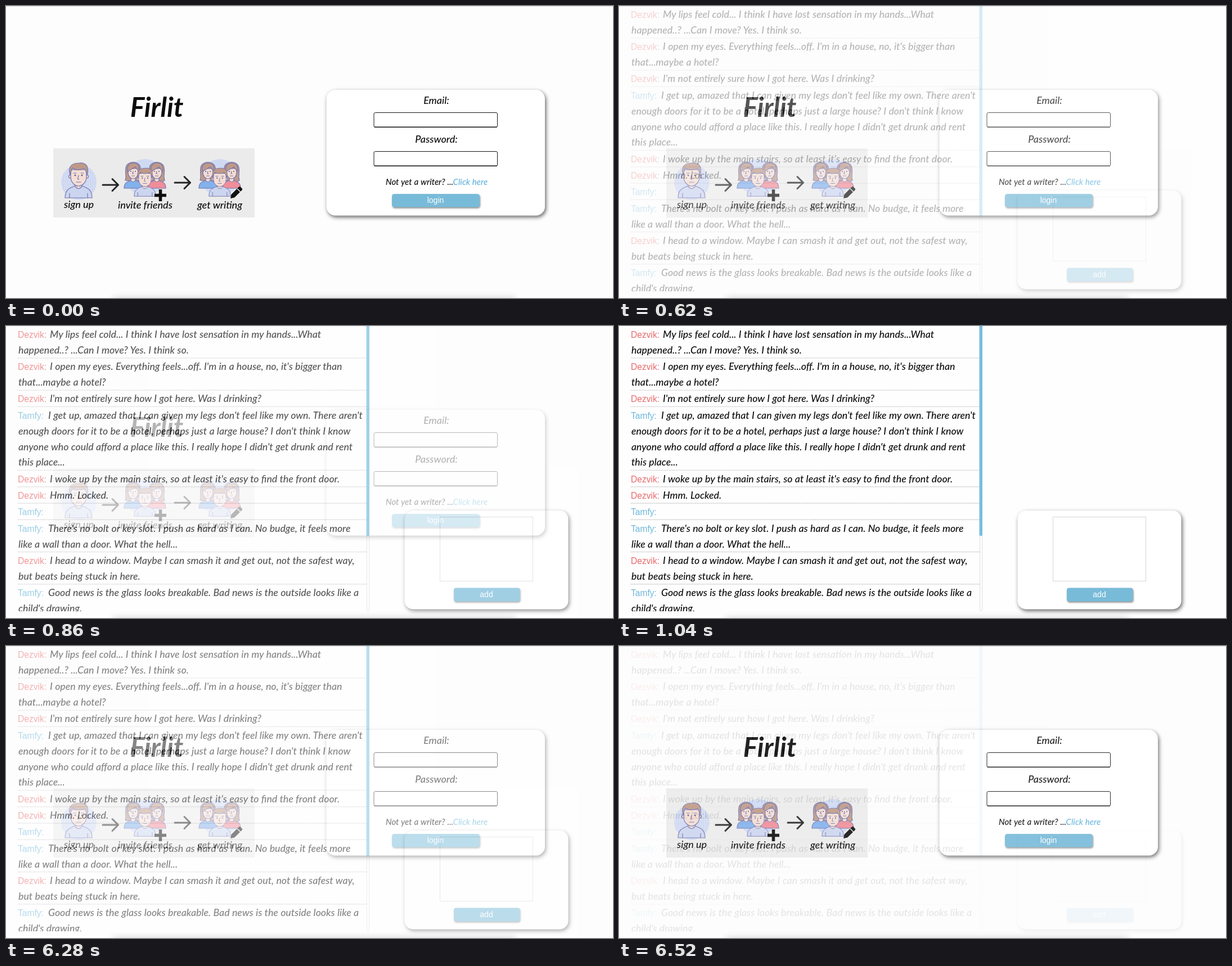
These frames come from a looping animation (1079 by 519 pixels, 6.58 s). An HTML page:

```html
<!DOCTYPE html>
<html lang="en">
<head>
<meta charset="utf-8">
<title>Story writing</title>
<style>
  html, body { margin: 0; width: 100%; height: 100%; overflow: hidden; background: #fdfdfd; }
  svg { display: block; width: 1079px; height: 519px; }
  text { font: 16px "Liberation Sans", Arial, sans-serif; white-space: pre; }
  .hand { font: italic 500 18px Lato, "Open Sans", sans-serif; fill: #0c0c0c; }
  .title { font-size: 48px; font-weight: 700; }
  .small { font-size: 15px; word-spacing: .5px; }
  .tale { font-size: 17.7px; word-spacing: .3px; }
  .mid { text-anchor: middle; }
  .link { fill: #5fb2dc; }
  .label { font-size: 14px; fill: #fff; text-anchor: middle; }
  .name { font-size: 15.6px; }
  .red { fill: #ea6a6c; }
  .blue { fill: #6fb8da; }
  .card { fill: #fff; filter: drop-shadow(2px 3px 3.5px rgba(0, 0, 0, .6)); }
  .button { fill: #78bbd9; filter: drop-shadow(1px 2px 1.5px rgba(0, 0, 0, .45)); }
  .rule { stroke: #b9b9b9; stroke-width: 1.4; stroke-dasharray: 1.4 1.4; }
  .person { stroke: #7276b0; stroke-width: 1.2; stroke-linejoin: round; stroke-linecap: round; }
  .skin { fill: #f4ddd3; }
  .hair { fill: #bf9988; }
  .shirt { fill: #ccd5ef; }
  .line { fill: none; }
  .dot { fill: #5a5d96; stroke: none; }
  .arrow { fill: none; stroke: #252525; stroke-width: 3; stroke-linecap: round; stroke-linejoin: round; }
</style>
</head>
<body>
<svg viewBox="0 0 1079 519">
  <defs>
    <clipPath id="page"><rect width="641" height="507"/></clipPath>
    <pattern id="dots" width="4" height="4" patternUnits="userSpaceOnUse">
      <rect width="4" height="4" fill="#d3dcf3"/>
      <circle cx="2" cy="2" r=".8" fill="#b9c8ec"/>
    </pattern>
    <filter id="soft" x="-10%" y="-300%" width="120%" height="700%"><feGaussianBlur stdDeviation="6"/></filter>

    <g id="man" class="person">
      <path class="shirt" d="M-24 41C-24 27-17 24-7 20H7C17 24 24 27 24 41Z"/>
      <path class="skin" d="M-6 14V21Q0 28 6 21V14Z"/>
      <circle class="skin" cx="-14.5" cy="3" r="3"/>
      <circle class="skin" cx="14.5" cy="3" r="3"/>
      <path class="skin" d="M-14-9V4C-14 14-6 20 0 20S14 14 14 4V-9Z"/>
      <path class="hair" d="M-15 1C-19-13-14-21 1-21C15-22 19-13 15 1C14-5 13-9 10-11C2-8-5-8-11-12C-13-8-14-5-15 1Z"/>
      <path class="line" d="M-9-3H-4M4-3H9M0 1L-1.5 8H1M-4 13H4M-16 33V41M16 33V41"/>
      <circle class="dot" cx="-6" cy="1" r="1.4"/>
      <circle class="dot" cx="6" cy="1" r="1.4"/>
    </g>

    <g id="woman" class="person">
      <path class="hair" d="M-14 17C-11 8-15 3-13-5C-12-19 12-19 13-5C15 3 11 8 14 17Q9 21 0 19T-14 17Z"/>
      <path d="M-16 31C-16 21-11 20-4 17H4C11 20 16 21 16 31Z"/>
      <path class="skin" d="M-4 11V17Q0 22 4 17V11Z"/>
      <path class="skin" d="M-9-4V3C-9 10-4 14 0 14S9 10 9 3V-4Z"/>
      <path class="hair" d="M-10 2C-12-12-5-14 1-14C9-14 12-8 10 2C8-2 7-4 4-7C0-4-5-3-10 2Z"/>
      <path class="line" d="M0 1L-1 5H1M-2.5 9H2.5"/>
      <circle class="dot" cx="-4" cy="1" r="1"/>
      <circle class="dot" cx="4" cy="1" r="1"/>
    </g>

    <g id="group">
      <circle cy="5" r="33" fill="#cfdaf2"/>
      <use href="#woman" x="-21" y="-7" fill="#83b1eb"/>
      <use href="#woman" x="21" y="-7" fill="#f08d99"/>
      <use href="#man" transform="translate(0 5) scale(.8)"/>
    </g>

    <path id="arrow" class="arrow" d="M0 0H27M17-10.5L27.5 0L17 10.5"/>
    <rect id="glow" x="190" y="517" width="715" height="12" fill="#000" opacity=".13" filter="url(#soft)"/>
  </defs>

  <g id="login">
    <rect width="1079" height="519" fill="#fdfdfd"/>
    <rect width="1079" height="1" fill="#d9d9d9"/>
    <use href="#glow"/>
    <text class="hand title mid" x="268" y="197">Firlit</text>

    <rect x="84" y="253" width="358" height="123" fill="#ebebeb"/>
    <circle cx="129.5" cy="313" r="31.5" fill="url(#dots)"/>
    <use href="#man" x="129" y="300"/>
    <use href="#group" x="247" y="300"/>
    <use href="#group" x="380" y="300"/>
    <use href="#arrow" x="172" y="318"/>
    <use href="#arrow" x="300" y="314"/>
    <path d="M274.5 326V347M264 336.5H285" stroke="#0c0c0c" stroke-width="5.5"/>
    <g transform="translate(399 342) rotate(-45)" fill="#111">
      <path d="M0 0L6-4H20V4H6Z"/>
      <path d="M21.5-4H25Q27-4 27-2V2Q27 4 25 4H21.5Z"/>
    </g>
    <text class="hand mid" x="129.5" y="359">sign up</text>
    <text class="hand mid" x="247.5" y="360">invite friends</text>
    <text class="hand mid" x="380" y="360">get writing</text>

    <rect class="card" x="569.5" y="149" width="388.5" height="223.5" rx="16"/>
    <text class="hand mid" x="765" y="174">Email:</text>
    <text class="hand mid" x="765" y="243">Password:</text>
    <g id="fields"></g>
    <text class="hand small" x="675" y="318">Not yet a writer? ...<tspan class="link">Click here</tspan></text>
    <rect class="button" x="686" y="334" width="156" height="23.5" rx="4.5"/>
    <text class="label" x="763.5" y="350">login</text>
  </g>

  <g id="story" opacity="0">
    <rect width="1079" height="519" fill="#fefefe"/>
    <use href="#glow"/>
    <g id="lines" clip-path="url(#page)"></g>
    <rect x="641.5" y="-6" width="4" height="512.5" rx="2" fill="#fff" stroke="#ddd"/>
    <rect x="640.5" y="-6" width="5.5" height="379" rx="2.5" fill="#78bedd"/>
    <rect class="card" x="708.5" y="328" width="291" height="175.5" rx="15"/>
    <rect x="771.5" y="339.5" width="165" height="114" fill="#fff" stroke="#d6d6d6"/>
    <rect class="button" x="796" y="465.5" width="117.5" height="24" rx="4"/>
    <text class="label" x="854" y="482">add</text>
  </g>
</svg>

<script>
const $ = id => document.getElementById(id);

function add(parent, tag, attrs, text = '') {
  const node = document.createElementNS('http://www.w3.org/2000/svg', tag);
  for (const key in attrs) node.setAttribute(key, attrs[key]);
  node.textContent = text;
  parent.append(node);
}

for (const y of [190, 259]) {
  add($('fields'), 'rect', { x: 654, y: y - .5, width: 219.5, height: 26, rx: 2.5, fill: '#fff', stroke: '#161616' });
  add($('fields'), 'rect', { x: 655, y: y + 24.5, width: 217.5, height: 1.5, fill: '#0c0c0c' });
}

const writers = [
  { name: 'Dezvik:', tone: 'red', x: 78 },
  { name: 'Tamfy:', tone: 'blue', x: 75 }
];

const entries = [
  [0, 'My lips feel cold... I think I have lost sensation in my hands...What',
    'happened..? ...Can I move? Yes. I think so.'],
  [0, "I open my eyes. Everything feels...off. I'm in a house, no, it's bigger than",
    'that...maybe a hotel?'],
  [0, "I'm not entirely sure how I got here. Was I drinking?"],
  [1, "I get up, amazed that I can given my legs don't feel like my own. There aren't",
    "enough doors for it to be a hotel, perhaps just a large house? I don't think I know",
    "anyone who could afford a place like this. I really hope I didn't get drunk and rent",
    'this place...'],
  [0, "I woke up by the main stairs, so at least it's easy to find the front door."],
  [0, 'Hmm. Locked.'],
  [1, ''],
  [1, "There's no bolt or key slot. I push as hard as I can. No budge, it feels more",
    'like a wall than a door. What the hell...'],
  [0, 'I head to a window. Maybe I can smash it and get out, not the safest way,',
    'but beats being stuck in here.'],
  [1, 'Good news is the glass looks breakable. Bad news is the outside looks like a',
    "child's drawing."]
];

const lineHeight = 27.9;
let y = 0;
for (const [who, ...lines] of entries) {
  const writer = writers[who];
  add($('lines'), 'text', { class: 'name ' + writer.tone, x: 21, y: y + 21 }, writer.name);
  lines.forEach((line, i) => {
    add($('lines'), 'text', { class: 'hand tale', x: i ? 22 : writer.x, y: y + 21 + i * lineHeight }, line);
  });
  y += lines.length * lineHeight + 1.4;
  add($('lines'), 'line', { class: 'rule', x1: 21, x2: 641, y1: y - .3, y2: y - .3 });
}

// Cross-fade in 60 ms steps: time, opacity, steps until the next row
const duration = 6580;
const fade = [
  [0, 0, 1],
  [500, .1, 9],
  [1040, 1, 1],
  [6040, .9, 9],
  [duration, 0, 1]
];
const fading = $('story').animate(
  fade.map(([time, opacity, steps]) => ({ offset: time / duration, opacity, easing: `steps(${steps}, end)` })),
  { duration, iterations: Infinity }
);
fading.startTime = 0;
</script>
</body>
</html>
```
